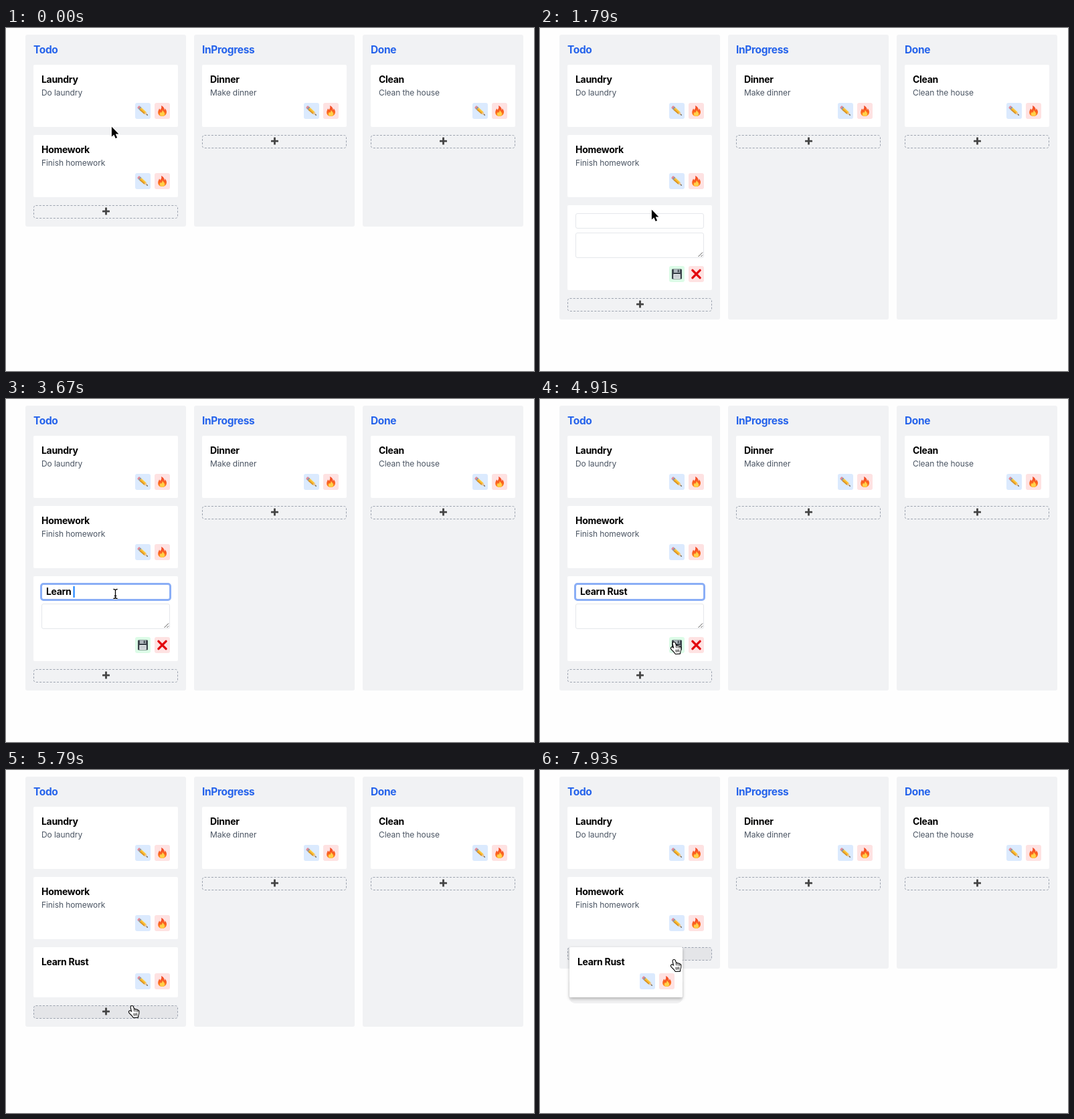
Recreate the animation shown at these times as an HTML page with a canvas. Size 789 px wide and 513 px high, loop 8000 ms.

```html
<!DOCTYPE html>
<html lang="en">
<head>
<meta charset="utf-8">
<title>Task board</title>
<style>
html, body { margin: 0; width: 100%; height: 100%; overflow: hidden; background: #fefefe; }
canvas { display: block; width: 789px; height: 513px; }
</style>
</head>
<body>
<canvas id="stage"></canvas>
<script>
const W = 789, H = 513, LOOP = 8000;
const canvas = document.getElementById('stage');
const ctx = canvas.getContext('2d');
const scale = window.devicePixelRatio || 1;
canvas.width = W * scale;
canvas.height = H * scale;

const FONT = 'Inter, "Open Sans", sans-serif';
const HEADING = { font: `700 15.5px ${FONT}`, color: '#2563eb', spacing: '-0.35px' };
const TITLE = { font: `700 14px ${FONT}`, color: '#000', spacing: '-0.3px' };
const NOTE = { font: `400 12px ${FONT}`, color: '#4b5563', spacing: '-0.08px' };

const EDIT = 1790, FOCUS = 2510, BLUR = 5090, SAVE = 5180, DRAG = 7930;

// Pointer moves: first step, last step, step count, x, y
const MOVES = [
  [360, 360, 1, 157, 148],
  [720, 1430, 9, 166, 271],
  [2150, 2420, 4, 163, 291],
  [4290, 4820, 7, 198, 357],
  [4910, 4910, 1, 201, 364],
  [5620, 5790, 3, 189, 353],
  [5880, 6060, 3, 111, 300],
  [6690, 6870, 3, 158, 291],
  [6960, 7130, 3, 190, 297],
  [7490, 7490, 1, 182, 290],
  [7580, 7660, 2, 189, 284],
  [7930, 7930, 1, 201, 284]
];

// Typed text: time of each key
const KEYS = [[3140, 'L'], [3230, 'e'], [3315, 'a'], [3400, 'r'], [3490, 'n'],
  [3670, ' '], [3850, 'R'], [4020, 'u'], [4110, 's'], [4200, 't']];

const ease = u => u * u * (3 - 2 * u);
const inside = (p, x, y, w, h) => p.x >= x && p.x < x + w && p.y >= y && p.y < y + h;

function pointerAt(t) {
  let x = 157, y = 147;
  for (const [start, end, n, toX, toY] of MOVES) {
    if (t < start) break;
    const dt = (end - start) / (n - 1) || 1;
    const step = Math.min(n, Math.floor((t - start) / dt + 0.02) + 1);
    const u = ease(step / n);
    x += (toX - x) * u;
    y += (toY - y) * u;
  }
  return { x, y };
}

function box(x, y, w, h, r, fill, stroke, line = 1) {
  ctx.beginPath();
  ctx.roundRect(x, y, w, h, r);
  if (fill) { ctx.fillStyle = fill; ctx.fill(); }
  if (stroke) { ctx.strokeStyle = stroke; ctx.lineWidth = line; ctx.stroke(); }
}

function setText(style) {
  ctx.font = style.font;
  ctx.fillStyle = style.color;
  ctx.letterSpacing = style.spacing;
}

function text(str, x, y, style) {
  setText(style);
  ctx.fillText(str, x, y);
}

function shape(d, fill, stroke, line = 1) {
  const p = new Path2D(d);
  if (stroke) { ctx.strokeStyle = stroke; ctx.lineWidth = line; ctx.stroke(p); }
  if (fill) { ctx.fillStyle = fill; ctx.fill(p); }
}

function at(x, y, draw, turn = 0) {
  ctx.save();
  ctx.translate(x, y);
  ctx.rotate(turn);
  draw();
  ctx.restore();
}

function pencil() {
  const body = ctx.createLinearGradient(0, -2.4, 0, 2.4);
  body.addColorStop(0, '#ffd34f');
  body.addColorStop(0.5, '#f9b52c');
  body.addColorStop(1, '#c67c16');
  box(-9.6, -2.3, 3.5, 4.6, 1.4, '#e58a94');
  box(-7, -2.3, 2.2, 4.6, 0, '#8d979d');
  box(-4.9, -2.3, 9.6, 4.6, 0, body);
  shape('M4.6 -2.3L10 0L4.6 2.3Z', '#e8c394');
  shape('M8 -.9L10.3 0L8 .9Z', '#333');
}

function fire() {
  const flame = ctx.createLinearGradient(0, -8, 0, 8);
  flame.addColorStop(0, '#f0442a');
  flame.addColorStop(0.6, '#fb641f');
  flame.addColorStop(1, '#ff9a1f');
  shape('M-1.6 -8C2 -6.6 3.4 -3.7 3.2 -1.2C4.2 -1.8 4.3 -3.1 4 -4.1' +
    'C6.2 -1.6 7 1 6.3 3.6C5.5 6.6 3 8 0 8C-3.6 8 -6.3 5.9 -6.3 2.5' +
    'C-6.3 .2 -5.2 -1.5 -4.5 -3.4C-3.6 -2.8 -3.4 -2 -3.3 -1.2C-1.4 -3 -.6 -5.4 -1.6 -8Z', flame);
  shape('M.2 -1.7C.8 .6 3.9 2 3.6 4.7C3.3 6.9 1.8 7.8 0 7.8C-2.2 7.8 -3.7 6.5 -3.6 4.4' +
    'C-3.5 3.2 -2.8 2.5 -2.4 1.6C-1.9 2 -1.7 2.5 -1.5 3C-.2 1.8 .4 .2 .2 -1.7Z', '#ffd04a');
}

function floppy() {
  box(-7.5, -7.5, 15, 15, 1.2, '#3b444b');
  box(-4.6, -7.2, 9.2, 5.2, 0.5, '#aeb7bd');
  box(1.2, -6.5, 2, 3.8, 0, '#3b444b');
  box(-5.2, 0, 10.4, 7, 0.5, '#e6eaec');
  box(-4, 2, 8, 0.8, 0, '#9ba5ab');
  box(-4, 4.3, 8, 0.8, 0, '#9ba5ab');
}

function cross() {
  ctx.lineCap = 'round';
  shape('M-5.6 -5.6L5.6 5.6M5.6 -5.6L-5.6 5.6', null, '#e3060c', 3.4);
}

function tools(right, y, editing) {
  const x1 = right - 64, x2 = right - 35;
  box(x1, y, 23, 24, 3, editing ? '#dcfce7' : '#dbeafe');
  box(x2, y, 23, 24, 3, '#fee2e2');
  at(x1 + 11.5, y + 12, editing ? floppy : pencil, editing ? 0 : 0.74);
  at(x2 + 11.5, y + 12, editing ? cross : fire);
}

function card(x, y, w, title, note) {
  const h = note ? 93 : 75;
  box(x, y, w, h, 2, '#fff');
  text(title, x + 12, y + 27, TITLE);
  if (note) text(note, x + 12, y + 46, NOTE);
  tools(x + w, y + h - 36, false);
}

function addButton(x, y, hover) {
  ctx.setLineDash([3, 2.2]);
  box(x + 0.5, y + 0.5, 215, 19, 3, hover ? '#e4e5e8' : null, '#9ca3af');
  ctx.setLineDash([]);
  box(x + 103, y + 7.7, 11, 2.8, 0.6, '#444');
  box(x + 107.1, y + 3.6, 2.8, 11, 0.6, '#444');
}

function editor(t) {
  box(41, 265, 216, 127, 2, '#fff');
  const focused = t >= FOCUS && t < BLUR;
  if (focused) box(52.5, 276.5, 193, 24, 3.5, '#fff', '#8aaef6', 3);
  else box(53.5, 277.5, 191, 22, 2.5, '#fff', '#e5e7eb');
  const typed = KEYS.filter(k => t >= k[0]).map(k => k[1]).join('');
  text(typed, 60, 293, TITLE);
  const blink = t >= 3050 && t < 3140 || t >= 4910;
  if (focused && !blink) box(60 + ctx.measureText(typed).width, 280, 2, 17, 0, '#0a7aff');

  box(53.5, 306.5, 191, 37, 2.5, '#fff', '#e5e7eb');
  ctx.lineCap = 'butt';
  shape('M236.5 342L243 335.5M240.5 342L243 339.5', null, '#555', 1);
  tools(257, 356, true);
}

function ghost() {
  box(43.5, 310, 170, 39, 9, '#f0f0f1');
  ctx.save();
  ctx.shadowColor = 'rgba(0,0,0,.28)';
  ctx.shadowBlur = 5 * scale;
  ctx.shadowOffsetY = 2 * scale;
  box(44, 265, 169, 75, 2, '#fff');
  ctx.restore();
  card(44, 265, 169, 'Learn Rust');
}

const pointers = {
  arrow() {
    ctx.lineJoin = 'miter';
    shape('M.9 .8V15.6L4.3 12.4L6.7 18L9.1 17L6.7 11.5H11.4Z', '#000', '#fff', 2);
  },
  hand() {
    ctx.lineJoin = 'round';
    shape('M-2.4 1.7C-2.3 -.2 .3 -.4 .9 1.2L2.3 5.5C3 4.5 4.7 4.8 5 6C5.8 5.2 7.2 5.6 7.5 6.8' +
      'C8.4 6.3 9.2 7 9.3 8C9.6 10.4 9.2 12.2 8.3 14L8.1 16.6L1.5 17' +
      'C1 15.2 -2.8 12.2 -4.7 9.8C-5.9 8 -4.2 6.8 -2.7 7.8L-.7 9.2Z', '#fff', '#000', 2.2);
    ctx.lineCap = 'round';
    shape('M2.3 5.5L2.9 8M5 6L5.4 8.2M7.5 6.8L7.8 8.6M2.1 11.2L2.5 14.4M4.3 11L4.6 14.2M6.5 10.8L6.6 14', null, '#000', 0.9);
  },
  beam() {
    const d = 'M-2.6 -6.5Q.5 -6.5 .5 -4.5V5.5Q.5 7.5 -2.6 7.5M3.6 -6.5Q.5 -6.5 .5 -4.5M.5 5.5Q.5 7.5 3.6 7.5M-1.2 3.5H2.2';
    ctx.lineCap = 'butt';
    shape(d, null, '#fff', 3);
    shape(d, null, '#000', 1.3);
  }
};

function render(t) {
  ctx.setTransform(scale, 0, 0, scale, 0, 0);
  ctx.fillStyle = '#fefefe';
  ctx.fillRect(0, 0, W, H);

  const editing = t >= EDIT && t < SAVE;
  const saved = t >= SAVE && t < DRAG;
  const addY = editing ? 404 : saved ? 352 : 265;
  const p = pointerAt(t);
  const overAdd = inside(p, 41, addY, 216, 20);
  const overSave = editing && inside(p, 193, 356, 23, 24);
  const overField = editing && (inside(p, 53, 277, 192, 24) || inside(p, 53, 306, 192, 38));

  ['Todo', 'InProgress', 'Done'].forEach((name, i) => {
    const x = 29 + 252 * i;
    box(x, 10, 240, addY + 22, 3, '#f1f2f4');
    text(name, x + 12, 38, HEADING);
  });
  card(41, 55, 216, 'Laundry', 'Do laundry');
  card(41, 160, 216, 'Homework', 'Finish homework');
  card(293, 55, 216, 'Dinner', 'Make dinner');
  card(545, 55, 216, 'Clean', 'Clean the house');
  addButton(293, 160);
  addButton(545, 160);
  addButton(41, addY, overAdd);

  if (editing) editor(t);
  if (saved) card(41, 265, 216, 'Learn Rust');
  if (t >= DRAG) ghost();

  const kind = overField ? 'beam' : overAdd || overSave ? 'hand' : 'arrow';
  at(Math.round(p.x), Math.round(p.y), pointers[kind]);
}

const begin = performance.now();
function tick() {
  render((performance.now() - begin) % LOOP);
  requestAnimationFrame(tick);
}
tick();
</script>
</body>
</html>
```
